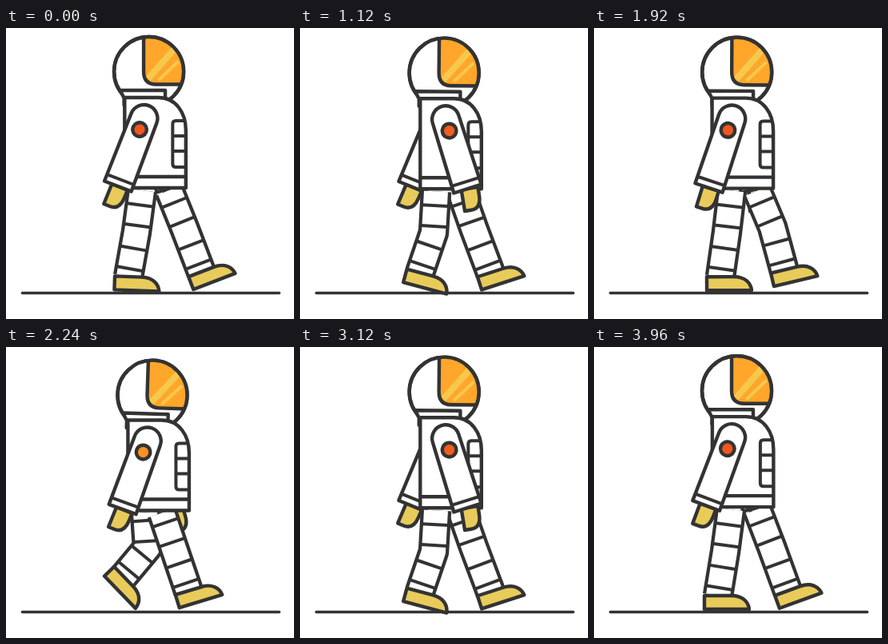
An HTML page with a canvas for the animation above (4 s loop, 360x364 px).

```html
<!DOCTYPE html>
<html lang="en">
<head>
<meta charset="utf-8">
<title>Walking astronaut</title>
<style>
html, body { margin: 0; width: 100%; height: 100%; overflow: hidden; background: #fff; }
canvas { display: block; width: 360px; height: 364px; }
</style>
</head>
<body>
<canvas id="stage"></canvas>
<script>
const STRIDE = 2000, STEP = 40;
const INK = '#333334', SUIT = '#fff', BOOT = '#e8cb5a', VISOR = '#ffa62b', GLINT = '#f6c84c';

// time, hip x, knee x, knee y, ankle x, ankle y, foot angle
const LEG = [
  [0, 204, 223, 250, 244, 305, -21],
  [120, 201, 217, 250, 238, 306, -18],
  [240, 195, 210, 252, 228, 305, -17],
  [380, 191, 201, 256, 213, 310, -3],
  [520, 186, 190, 258, 195, 311, 0],
  [640, 180, 180, 258, 180, 312, 0],
  [960, 171, 164, 256, 155, 311, 0],
  [1000, 170, 163, 255, 153, 311, 2],
  [1120, 170, 167, 256, 150, 306, 15],
  [1240, 174, 177, 251, 147, 287, 46],
  [1520, 192, 202, 243, 157, 273, 63],
  [1640, 198, 220, 240, 183, 280, 46],
  [1800, 203, 226, 246, 221, 294, 10],
  [1960, 204, 222, 250, 242, 305, -20]
];
// time, arm angle, extra hand angle
const ARM = [
  [0, 21, 1], [120, 22, 1], [240, 20, 2], [520, 4, 15], [760, -9, 14],
  [1000, -16.5, 10], [1120, -17.5, 8], [1300, -14, -4], [1640, 2.5, -11], [1960, 20.5, 0]
];

const canvas = document.getElementById('stage');
const ctx = canvas.getContext('2d');
const ratio = window.devicePixelRatio || 1;
canvas.width = 360 * ratio;
canvas.height = 364 * ratio;

const rad = deg => deg * Math.PI / 180;
const wave = (t, peak = 0) => Math.cos(2 * Math.PI * (t - peak) / 1000);

// Smooth periodic curve through keyed poses
function pose(keys, time) {
  const t = ((time % STRIDE) + STRIDE) % STRIDE, n = keys.length;
  const at = i => {
    const row = keys[(i + n) % n];
    return [row[0] + Math.floor(i / n) * STRIDE, ...row.slice(1)];
  };
  let i = n - 1;
  while (keys[i][0] > t) i--;
  const [a, b, c, d] = [at(i - 1), at(i), at(i + 1), at(i + 2)];
  const h = c[0] - b[0], u = (t - b[0]) / h, u2 = u * u, u3 = u2 * u;
  return b.slice(1).map((p, k) => {
    const j = k + 1;
    const m0 = h * (c[j] - a[j]) / (c[0] - a[0]);
    const m1 = h * (d[j] - b[j]) / (d[0] - b[0]);
    return (2 * u3 - 3 * u2 + 1) * p + (u3 - 2 * u2 + u) * m0
      + (3 * u2 - 2 * u3) * c[j] + (u3 - u2) * m1;
  });
}

function shape(d, fill, width = 4.4) {
  const path = new Path2D(d);
  if (fill) { ctx.fillStyle = fill; ctx.fill(path); }
  line(path, width, INK);
}

function line(path, width, color) {
  ctx.lineWidth = width;
  ctx.strokeStyle = color;
  ctx.stroke(path);
}

function place(x, y, deg, draw) {
  ctx.save();
  ctx.translate(x, y);
  ctx.rotate(rad(deg));
  draw();
  ctx.restore();
}

const drop = t => 4.8 * (1 - wave(t));
const sway = t => 150.5 + 3 * wave(t, 380);

function band(x1, y1, x2, y2, back) {
  const len = Math.hypot(x2 - x1, y2 - y1);
  const ux = (x2 - x1) / len, uy = (y2 - y1) / len;
  const x = x2 - ux * back, y = y2 - uy * back;
  shape(`M${x - uy * 16},${y + ux * 16}L${x + uy * 16},${y - ux * 16}`, null, 4);
}

function leg(t) {
  const [hx, kx, ky, ax, ay, tilt] = pose(LEG, t);
  const hy = 203 + drop(t);
  const limb = new Path2D(`M${hx},${hy}L${kx},${ky}L${ax},${ay}`);
  ctx.lineCap = 'butt';
  line(limb, 38.5, INK);
  line(limb, 30, SUIT);
  for (const back of [10, 36]) band(kx, ky, ax, ay, back);
  for (const back of [8, 34]) band(hx, hy, kx, ky, back);
  place(ax, ay, tilt, () => shape('M-17,0H17C31,0 38,8 39,17H-17Z', BOOT));
}

function arm(t) {
  const [angle, wrist] = pose(ARM, t);
  const x = sway(t) + 28.3 - 0.2 * angle, y = 113 + drop(t);
  const glow = Math.min(1, Math.max(0, 0.5 + 2 * wave(t, 400)));
  place(x, y, angle, () => {
    place(0, 91, wrist, () => shape('M-8,0V27H0Q13,27 13,10V0Z', BOOT));
    shape('M-17,0A17,17 0 0 1 17,0L18,91H-18Z', SUIT);
    shape('M-18,82H18', null, 4);
    shape('M-8.8,15a8.8,8.8 0 1 0 17.6,0a8.8,8.8 0 1 0 -17.6,0Z',
      `rgb(${240 + 8 * glow},${86 + 60 * glow},${30 + 4 * glow})`);
  });
}

function head(t) {
  place(182.5 + 4 * wave(t, 470), 60.5 - 6 * wave(t), 2 * (1 - wave(t)), () => {
    const globe = 'M-43.5,0a43.5,43.5 0 1 0 87,0a43.5,43.5 0 1 0 -87,0Z';
    const glass = 'M-6.5,-46V0Q-6.5,16 9,16H50V-46Z';
    shape(globe, SUIT);
    ctx.save();
    ctx.clip(new Path2D(globe));
    ctx.save();
    ctx.clip(new Path2D(glass));
    ctx.fillStyle = VISOR;
    ctx.fillRect(-10, -50, 60, 70);
    line(new Path2D('M36,-33L-1,9'), 8, GLINT);
    line(new Path2D('M37,-13L12,11'), 4, GLINT);
    ctx.restore();
    shape(glass);
    ctx.restore();
    shape(globe);
    shape('M-36,23.5H20.5V42H-31V33Z', SUIT);
  });
}

function torso(t) {
  place(sway(t), drop(t), 0, () => {
    shape('M0,87H42C64,87 76.5,106 76.5,128V200H0Z', SUIT);
    shape('M0,186H76');
    shape('M76,116H64Q60,116 60,120V170Q60,174 64,174H76M60,135H76M60,154H76', null, 4);
  });
}

function render(t) {
  ctx.setTransform(ratio, 0, 0, ratio, 0, 0);
  ctx.fillStyle = SUIT;
  ctx.fillRect(0, 0, 360, 364);
  ctx.lineJoin = 'round';
  ctx.lineCap = 'round';
  shape('M20.5,331.5H341.5', null, 3.6);
  const other = t + STRIDE / 2;
  arm(other);
  leg(other);
  leg(t);
  head(t);
  torso(t);
  arm(t);
}

const start = performance.now();
function tick() {
  const t = (performance.now() - start) % (2 * STRIDE);
  render(Math.floor(t / STEP) * STEP);
  requestAnimationFrame(tick);
}
tick();
</script>
</body>
</html>
```
